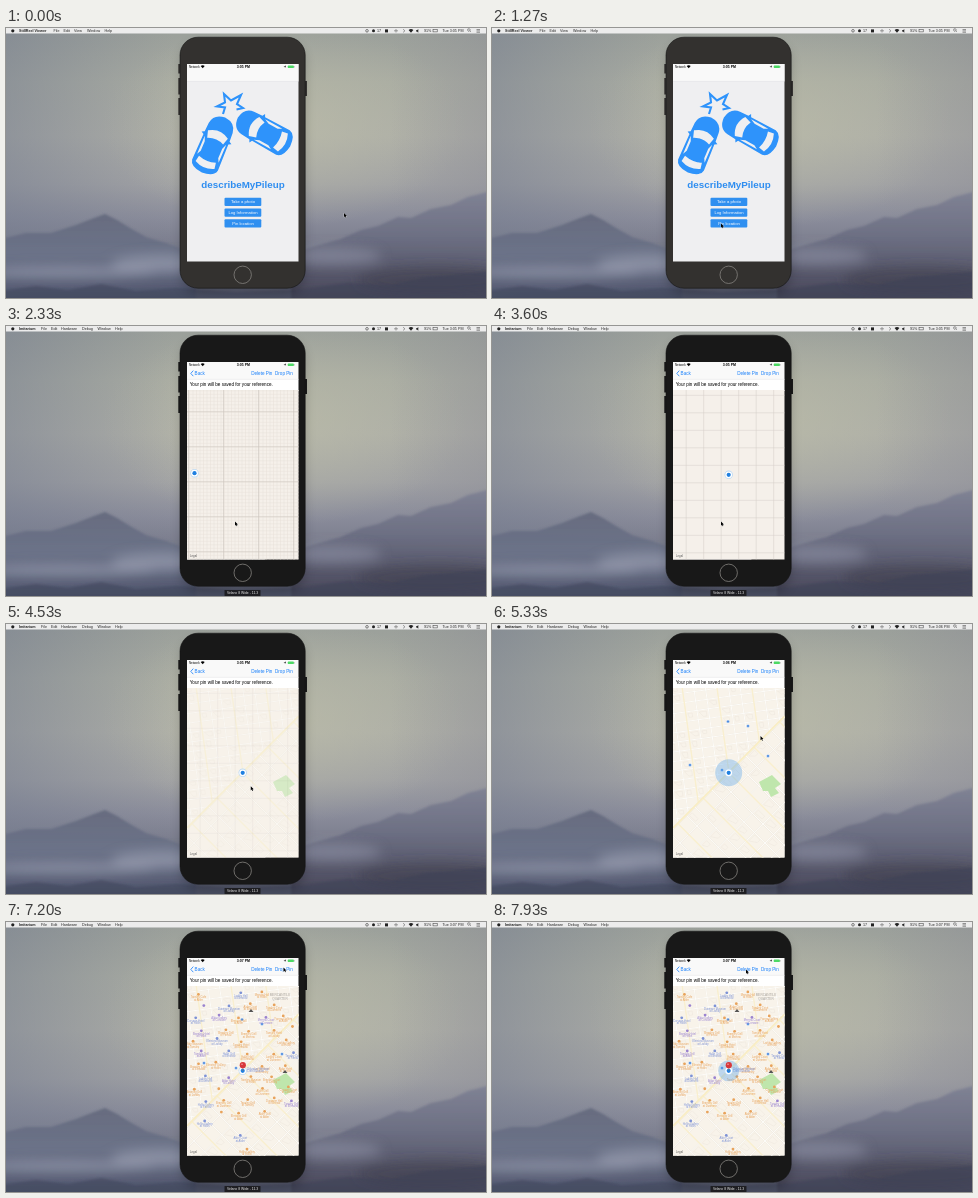
Animation of 480x270 px, one loop 8000 ms. Source, as an HTML page:

```html
<!DOCTYPE html>
<html lang="en">
<head>
<meta charset="utf-8">
<title>Accident helper demo</title>
<style>
html, body { margin: 0; height: 100%; overflow: hidden; background: #999e99; }
svg { display: block; width: 100vw; height: 100vh; font: 4.6px "Liberation Sans", Arial, sans-serif; }
.b { font-weight: bold; }
.menu { font-size: 3.7px; fill: #222; }
.mid { text-anchor: middle; }
.link { fill: #157efb; }
</style>
</head>
<body>
<svg viewBox="0 0 480 270" preserveAspectRatio="none">
<defs>
  <linearGradient id="sky" x2="0" y2="1">
    <stop offset="0" stop-color="#9a9f9a"/><stop offset=".2" stop-color="#a8aba2"/>
    <stop offset=".4" stop-color="#acada7"/><stop offset=".58" stop-color="#a0a1a4"/>
    <stop offset=".7" stop-color="#8b8d9b"/><stop offset="1" stop-color="#5b5f74"/>
  </linearGradient>
  <linearGradient id="sides">
    <stop offset="0" stop-color="#737b8e" stop-opacity=".5"/><stop offset=".35" stop-color="#737b8e" stop-opacity="0"/>
    <stop offset=".8" stop-color="#8a8a94" stop-opacity="0"/><stop offset="1" stop-color="#8a8a94" stop-opacity=".35"/>
  </linearGradient>
  <radialGradient id="glow" cx=".58" cy=".36" r=".38">
    <stop offset="0" stop-color="#bcbda8" stop-opacity=".7"/><stop offset="1" stop-color="#bcbda8" stop-opacity="0"/>
  </radialGradient>
  <linearGradient id="left" x2="0" y2="1">
    <stop offset="0" stop-color="#5f6579"/><stop offset=".45" stop-color="#6a7188"/><stop offset="1" stop-color="#4a5068"/>
  </linearGradient>
  <linearGradient id="right" x2="0" y2="1">
    <stop offset="0" stop-color="#7b7e92"/><stop offset=".4" stop-color="#686b80"/><stop offset="1" stop-color="#423f50"/>
  </linearGradient>
  <filter id="soft" x="-30%" y="-80%" width="160%" height="260%"><feGaussianBlur stdDeviation="6"/></filter>
  <filter id="haze"><feGaussianBlur stdDeviation="1.200"/></filter>
  <clipPath id="screen"><rect x="181" y="36" width="111.500" height="197.600"/></clipPath>
  <clipPath id="view"><rect x="181" y="64" width="112" height="170"/></clipPath>
  <clipPath id="north"><path d="M181 64h112v28L181 204z"/></clipPath>
  <clipPath id="south"><path d="M293 92v142H181v-30z"/></clipPath>
  <g id="car">
    <path fill="#2e93fb" d="M-12-18Q-11-28 0-29Q11-28 12-18L12.500-9L15-7.500L12.500-6L13 21Q12 28 0 29Q-12 28-13 21L-12.500-6L-15-7.500L-12.500-9z"/>
    <g fill="#efeff1">
      <path d="M-10-11Q0-18 10-11L8-4Q0-8-8-4z"/>
      <path d="M-8.500 15Q0 18 8.500 15L9.500 21Q0 26-9.500 21z"/>
      <path d="M-10.800-5L-8.800 0V10L-10.800 14zM10.800-5L8.800 0V10L10.800 14z"/>
    </g>
  </g>
</defs>

<rect width="480" height="270" fill="url(#sky)"/>
<rect width="480" height="270" fill="url(#glow)"/>
<rect width="480" height="270" fill="url(#sides)"/>
<g filter="url(#haze)">
  <path fill="url(#left)" opacity=".8" d="M-5 211L20 205L45 205L70 197L88 190L99 186L111 192L124 200L140 209L160 215L190 226V275H-5z"/>
  <path fill="url(#right)" opacity=".8" d="M285 226L310 218L335 211L355 202L372 198L392 189L405 190L425 181L445 177L462 169L485 163V275H285z"/>
</g>
<g filter="url(#soft)">
  <ellipse cx="60" cy="244" rx="90" ry="6" fill="#a4aabb" opacity=".55"/>
  <ellipse cx="155" cy="236" rx="50" ry="9" fill="#a0a6b8" opacity=".6"/>
  <ellipse cx="325" cy="228" rx="50" ry="9" fill="#8f93a6" opacity=".6"/>
  <ellipse cx="430" cy="252" rx="80" ry="14" fill="#3f3c4c" opacity=".5"/>
</g>
<path filter="url(#haze)" fill="#3b4056" opacity=".45" d="M-5 263L30 258L62 262L95 256L130 263L170 260L230 264L300 261L340 255L385 257L420 249L485 243V275H-5z"/>

<rect width="480" height="5.500" fill="#ececec"/>
<g class="menu">
  <circle cx="6.800" cy="2.800" r="1.600"/>
  <g id="menus"></g>
  <circle cx="361" cy="2.800" r="1.300" fill="none" stroke="#333" stroke-width=".6"/>
  <circle cx="367.500" cy="2.800" r="1.500"/><text x="371" y="4.200">17</text>
  <rect x="379" y="1.400" width="3" height="3"/>
  <path d="M388 2.800h4M390 1v3.500M397 1.200l2 1.600l-2 1.600" fill="none" stroke="#777" stroke-width=".7"/>
  <path d="M402.600 2Q405 0 407.400 2L405 4.700z"/>
  <path d="M410 2.200h1l1.300-1.100v3.600L411 3.600h-1z"/>
  <text x="418" y="4.200">91%</text><rect x="427" y="1.600" width="4.200" height="2.300" fill="none" stroke="#333" stroke-width=".5"/>
  <text id="clock" x="436.500" y="4.200"></text>
  <path d="M465 3.800l-1.200-1.100a1.200 1.200 0 1 0-.2.200M470.500 1.500h3.500M470.500 2.900h3.500M470.500 4.300h3.500" fill="none" stroke="#333" stroke-width=".5"/>
</g>

<rect x="176" y="16" width="122" height="250" rx="18" filter="url(#soft)" opacity=".25"/>
<g id="body">
  <path d="M172.300 36h3v9.500h-3zM172.300 50h3v16.500h-3zM172.300 70h3v17h-3zM298 53h3v15h-3z"/>
  <rect x="174" y="9.200" width="125.200" height="251" rx="18" stroke="#151515" stroke-width=".6"/>
</g>
<circle cx="236.700" cy="246.800" r="8.700" fill="none" stroke="#85827e" stroke-width=".8"/>

<g clip-path="url(#screen)">
  <g id="home">
    <rect x="181" y="36" width="112" height="198" fill="#efeff1"/>
    <use href="#car" transform="translate(207.500 117) rotate(23) scale(1.08 1.03)"/>
    <use href="#car" transform="translate(258 104) rotate(-61) scale(1.08 1.03)"/>
    <path d="M217 86L219 79.500L211 78.500L219 74.500L218 66L225 72.500L235 67L231 76L237 80L230.500 81.500" fill="none" stroke="#2e93fb" stroke-width="2.100"/>
    <text class="b mid" x="237" y="160" font-size="9.800" fill="#2e8df0">describeMyPileup</text>
    <g id="buttons" font-size="4.200" class="mid"></g>
  </g>
  <rect id="dim" x="181" y="36" width="112" height="198"/>
  <g id="page">
    <rect x="181" y="53" width="112" height="12" fill="#fff"/>
    <text x="183.700" y="59.700">Your pin will be saved for your reference.</text>
    <g clip-path="url(#view)">
      <rect x="181" y="64" width="112" height="170" fill="#f5f0ea"/>
      <rect id="warm" x="181" y="64" width="112" height="170" fill="#f8ecd2"/>
      <path id="minor" fill="none" stroke-width=".5"/>
      <path id="major" fill="none" stroke="#cbc5be" stroke-width=".6"/>
      <g id="map">
        <rect x="181" y="64" width="112" height="170" fill="#f8f3ea"/>
        <g id="streets"></g>
        <path d="M267 158L280 151L289 160L283 164L287 169L279 173L276 167L271 167z" fill="#bfe6ac"/>
      </g>
      <g id="stops" fill="#4a8be0"></g>
      <g id="places" font-size="2.700"></g>
      <circle id="pulse" fill="#3f97e8"/>
      <g id="dot">
        <circle r="4.200" fill="#bcd9f3"/><circle r="3.400" fill="#fff"/><circle r="2.100" fill="#2080e0"/>
      </g>
      <g id="pin">
        <path d="M0 0v-4" stroke="#777" stroke-width=".7"/>
        <circle cy="-5.800" r="3.100" fill="#d8383c"/><circle cx="-.8" cy="-6.800" r=".8" fill="#f6a5a2"/>
      </g>
      <text x="184" y="231.300" font-size="2.800" fill="#555">Legal</text>
    </g>
  </g>
  <path d="M181 36h112v17.300H181z" fill="#f9f9f9"/>
  <path d="M181 53.300h112" stroke="#d4d4d6" stroke-width=".4"/>
  <text x="183" y="40" font-size="2.900">Network</text>
  <path d="M194.700 38Q196.700 36.300 198.700 38L196.700 40.200z"/>
  <text id="time" class="b mid" x="237.300" y="40.200" font-size="3.500"></text>
  <path d="M277.500 38.800l2.600-1.300l-1.200 2.700v-1.400z"/>
  <rect x="281.800" y="37.600" width="6" height="2.500" rx=".6" fill="#4cd964"/><path d="M288.300 38.400v1" stroke="#555" stroke-width=".5"/>
  <g id="nav" class="link">
    <path d="M187.300 44.600L184.800 47.400L187.300 50.200" fill="none" stroke="#157efb" stroke-width=".8"/>
    <text id="back" y="48.900">Back</text>
    <text x="245.200" y="48.900">Delete Pin</text>
    <text id="drop" x="269" y="48.900">Drop Pin</text>
  </g>
</g>

<g id="tag">
  <rect x="218.500" y="264" width="36" height="6" rx=".6" fill="#1e1e22"/>
  <text class="mid" x="236.500" y="268.400" font-size="3.400" fill="#eee">Velano 8 Wide - 11.3</text>
</g>
<path id="cursor" d="M0 0v4.200l1-.9l.7 1.500l.7-.3l-.7-1.500h1.300z" stroke="#fff" stroke-width=".4" paint-order="stroke"/>
</svg>
<script>
const $ = id => document.getElementById(id);
const set = (id, attrs) => { for (const k in attrs) $(id).setAttribute(k, attrs[k]); };
const show = (id, opacity) => set(id, { opacity });
const move = (id, x, y) => set(id, { transform: `translate(${x} ${y})` });
const mix = (a, b, p) => a + (b - a) * p;
let seed = 11;
const rand = () => (seed = seed * 16807 % 2147483647) / 2147483647;

const menuRow = (name, items) => `<text class="b" x="13" y="4.200">${name}</text>` +
  items.map(([s, x]) => `<text x="${x}" y="4.200">${s}</text>`).join('');
const menus = [
  menuRow('StillReel Viewer', [['File', 47.5], ['Edit', 57.5], ['View', 68], ['Window', 81], ['Help', 98.5]]),
  menuRow('Imitarium', [['File', 35], ['Edit', 45], ['Hardware', 55], ['Debug', 76], ['Window', 91.5], ['Help', 109]])
];

$('buttons').innerHTML = ['Take a photo', 'Log Information', 'Pin location'].map((s, i) => {
  const y = 169.8 + i * 10.7;
  return `<rect x="218.500" y="${y}" width="36.800" height="8.200" rx="1" fill="#2f8ff0"/>
    <text id="b${i}" x="237" y="${y + 5.5}" fill="#fff">${s}</text>`;
}).join('');

// Two street grids that meet along a diagonal avenue
function streets(side, angle, dx, dy) {
  let lines = '', main = '', blocks = '';
  for (let i = -12; i <= 12; i++) {
    const v = `M${i * dx}-160v320`, h = `M-160 ${i * dy}h320`;
    if (i % 3) lines += v + h; else { lines += h; main += v; }
    for (let j = -12; j <= 12; j++)
      if (rand() < .55) blocks += `M${i * dx + 2} ${j * dy + 2}h${dx * (.3 + rand() * .4)}v${dy * (.3 + rand() * .3)}h-${dx * .3}z`;
  }
  return `<g clip-path="url(#${side})"><g transform="translate(237 149) rotate(${angle})" fill="none">
    <path d="${blocks}" stroke="#e9e3da" stroke-width=".4"/>
    <path d="${lines}" stroke="#eee8de" stroke-width="1.300"/><path d="${lines}" stroke="#fefdfa" stroke-width=".9"/>
    <path d="${main}" stroke="#f9efcf" stroke-width="1.400"/></g></g>`;
}
$('streets').innerHTML = streets('north', -8, 11.5, 9.5) + streets('south', -45, 12, 15) +
  '<path d="M181 204L293 92" stroke="#f9edc4" stroke-width="1.800"/>';

$('stops').innerHTML = [[236, 97.5], [256, 102], [276, 132], [198, 141], [230, 146]]
  .map(([x, y]) => `<circle cx="${x}" cy="${y}" r="1.500" stroke="#fff" stroke-width=".4"/>`).join('');

const first = ['Alder', 'Bramley', 'Corvane', 'Dunmere', 'Elmstow', 'Farrow', 'Hollin', 'Larkby', 'Merrow', 'Tansley'];
const last = ['Hotel', 'Gallery', 'Cafe', 'Hall', 'Grill', 'Court', 'Museum'];
const tints = ['#e8a35c', '#e8a35c', '#9a83d0', '#e8a35c', '#7d92d6'];
const pick = list => list[Math.floor(rand() * list.length)];
let places = '';
for (let row = 0; row < 14; row++) for (let col = 0; col < 5; col++) {
  const x = 187 + col * 22.5 + (row % 2) * 8 + rand() * 6, y = 69 + row * 11.8 + rand() * 5;
  const tint = pick(tints), a = pick(first), b = pick(last), c = pick(first);
  const nearDot = Math.hypot(x - 237, y - 149) < 8, inTitle = x > 257 && y < 82;
  if (nearDot || inTitle || rand() < (y > 188 ? .5 : .15)) continue;
  places += `<circle cx="${x}" cy="${y}" r="1.400" fill="${tint}"/>`;
  if (rand() < .85) places += `<g fill="${tint}" class="mid"><text x="${x}" y="${y + 4}">${a} ${b}</text><text x="${x}" y="${y + 6.4}">at ${c}</text></g>`;
}
$('places').innerHTML = places + `<g class="mid" fill="#a5a19a" font-size="3.200">
  <text x="274" y="73.500">MERCANTILE</text><text x="274" y="77.500">QUARTER</text></g>
  <g fill="#555"><path d="M242.500 90h5l-2.500-3zM276.500 151h5l-2.500-3z"/></g>
  <g fill="#7d92d6"><text x="241" y="147.500">Oakmoor Heritage</text><text x="241" y="150">Craft Museum</text></g>`;

function grid(x0, y0, step) {
  let d = '';
  const start = (origin, low) => origin + Math.ceil((low - origin) / step) * step;
  for (let x = start(x0, 181); x < 293; x += step) d += `M${x} 64v170`;
  for (let y = start(y0, 64); y < 234; y += step) d += `M181 ${y}h112`;
  return d;
}

const route = [[0, 338, 185], [530, 338, 185], [1120, 229, 195.5], [4250, 229, 195.5], [4900, 268.5, 112],
  [5450, 268.5, 112], [5860, 277.5, 45.5], [7250, 277.5, 45.5], [7760, 254, 47.5], [8000, 254, 47.5]];

function draw(t) {
  const ramp = (a, b) => Math.min(1, Math.max(0, (t - a) / (b - a)));
  const ease = (a, b) => { const u = ramp(a, b); return u * u * (3 - 2 * u); };

  const active = t >= 1500;
  if ($('menus').dataset.on !== String(active)) {
    $('menus').dataset.on = active;
    $('menus').innerHTML = menus[+active];
  }
  set('body', { fill: active ? '#181818' : '#33312f' });
  show('tag', +active);
  $('clock').textContent = `Tue 3:0${t < 4600 ? 5 : t < 5950 ? 6 : 7} PM`;
  $('time').textContent = `3:0${t < 4600 ? 5 : t < 6950 ? 6 : 7} PM`;

  // Push from home to map
  const push = 1 - (1 - ramp(1810, 2270)) ** 2;
  move('home', -33.6 * push, 0);
  move('page', 112 * (1 - push), 0);
  show('dim', .1 * ramp(1800, 1870));
  show('b2', active ? .25 : 1);
  show('nav', push ** 1.5);
  set('back', { x: mix(208, 188.6, push) });
  show('drop', t > 6740 && t < 6900 ? .3 : 1);

  // Grid zooms in around the location dot
  const zoom = ease(3130, 3580), scale = 5 ** zoom;
  const x = mix(188.5, 236.7, zoom), y = mix(147.2, 148.8, zoom);
  const ready = ramp(2200, 2320);
  show('warm', 1 - ready);
  set('minor', { d: grid(x - 1.5 * scale, y + 1.6 * scale, 3.5 * scale), stroke: zoom > .5 ? '#d3cdc6' : '#e6e0d9', opacity: ready });
  set('major', { d: grid(x + 29 * scale, y + 8.6 * scale, 35 * scale), opacity: ready * (1 - zoom) });
  move('dot', x, y);

  show('map', ramp(4300, 4700));
  show('stops', ramp(4800, 4950));
  show('places', ramp(5930, 6090));

  const beat = t < 4430 ? 0 : (t - 4430) % 2800, grow = Math.min(1, beat / 900);
  set('pulse', { cx: x, cy: y, r: 13.5 * grow, opacity: .32 * Math.min(1, Math.max(0, (1500 - beat) / 600)) });

  const fall = ramp(6800, 7080);
  show('pin', +(t >= 6800));
  move('pin', 236.8, mix(62, 149, fall * fall));

  const i = Math.max(1, route.findIndex(k => k[0] > t)), a = route[i - 1], b = route[i], p = ease(a[0], b[0]);
  move('cursor', mix(a[1], b[1], p), mix(a[2], b[2], p));
}

function tick() {
  draw(performance.now() % 8000);
  requestAnimationFrame(tick);
}
tick();
</script>
</body>
</html>
```
